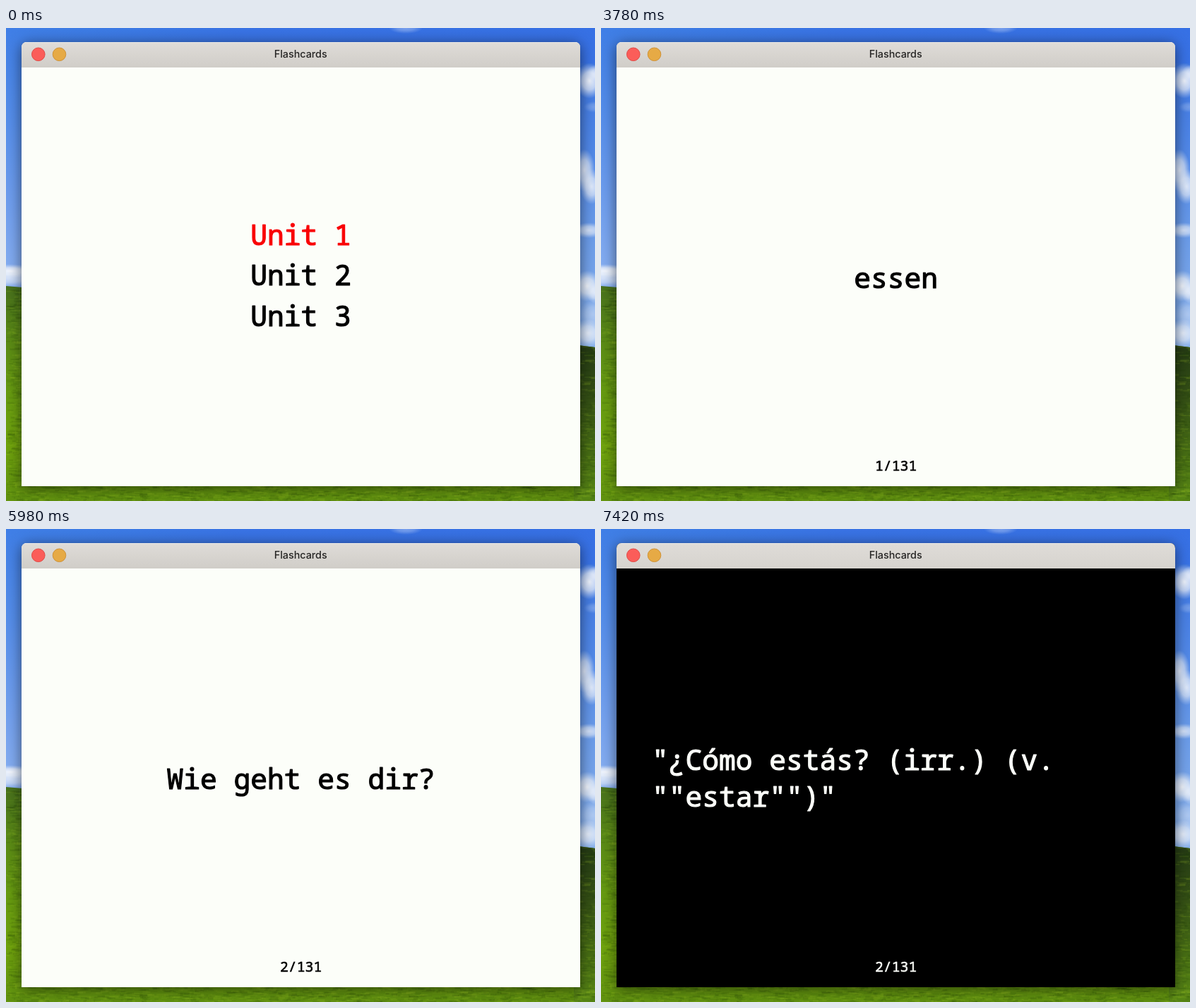
Write an HTML page with a canvas that moves like this. It is 834 px wide and 671 px high and loops after 8 s.

```html
<!DOCTYPE html>
<html lang="en">
<head>
<meta charset="utf-8">
<title>Flashcards</title>
<style>
  html, body { margin: 0; width: 100%; height: 100%; overflow: hidden; }
  canvas { display: block; width: 834px; height: 671px; }
</style>
</head>
<body>
<canvas id="stage" width="834" height="671"></canvas>
<script>
const W = 834, H = 671, LOOP = 8000;
const WIN = { x: 22, y: 20, w: 791, h: 630, bar: 36 };
const MID = 417.6;
const PAPER = '#fcfef9';
const MONO = '"Noto Sans Mono", "DejaVu Sans Mono", monospace';
const UI = 'Inter, Roboto, sans-serif';

const SCENES = [
  { at: 0, pick: 0 },
  { at: 1370, pick: 1 },
  { at: 2210, pick: 2 },
  { at: 3680, card: 1, lines: ['essen'] },
  { at: 4680, card: 1, lines: ['comer'], dark: true },
  { at: 5980, card: 2, lines: ['Wie geht es dir?'] },
  { at: 7290, card: 2, lines: ['"¿Cómo estás? (irr.) (v.', '""estar"")"'], dark: true }
];

const ctx = document.getElementById('stage').getContext('2d');
const backdrop = document.createElement('canvas');
backdrop.width = W;
backdrop.height = H;

function random(seed) {
  return () => (seed = (seed * 16807) % 2147483647) / 2147483647;
}

function fade(c, y0, y1, ...colors) {
  const g = c.createLinearGradient(0, y0, 0, y1);
  colors.forEach((color, i) => g.addColorStop(i / (colors.length - 1), color));
  return g;
}

function cloud(c, x, y, rx, ry, alpha) {
  c.save();
  c.translate(x, y);
  c.scale(rx, ry);
  const g = c.createRadialGradient(0, 0, 0, 0, 0, 1);
  g.addColorStop(0, `rgba(248,250,255,${alpha})`);
  g.addColorStop(0.5, `rgba(240,245,253,${alpha * 0.75})`);
  g.addColorStop(1, 'rgba(225,235,252,0)');
  c.fillStyle = g;
  c.fillRect(-1, -1, 2, 2);
  c.restore();
}

function hill(c) {
  c.beginPath();
  c.moveTo(0, 366);
  c.lineTo(24, 368);
  c.bezierCurveTo(300, 385, 600, 405, 810, 450);
  c.lineTo(W, 453);
  c.lineTo(W, H);
  c.lineTo(0, H);
  c.closePath();
}

function grass(c) {
  c.save();
  hill(c);
  c.clip();
  c.fillStyle = fade(c, 364, H, '#47701c', '#5a8a15', '#669a10', '#6fa30c', '#5f900f');
  c.fillRect(0, 360, W, H - 360);
  c.fillStyle = fade(c, 448, H, '#243a14', '#344f15', '#456b14', '#588714');
  c.fillRect(804, 445, 30, 226);
  const rnd = random(41);
  for (let i = 0; i < 2000; i++) {
    const onStrip = i % 3;
    const x = onStrip ? rnd() * W : (rnd() < 0.6 ? rnd() * 24 : 810 + rnd() * 24);
    const y = onStrip ? 646 + rnd() * 25 : 370 + rnd() * 280;
    const a = 0.05 + rnd() * 0.12;
    c.fillStyle = rnd() < 0.5 ? `rgba(30,60,5,${a})` : `rgba(160,200,40,${a})`;
    c.fillRect(x, y, 4 + rnd() * 10, 1 + rnd() * 2);
  }
  c.restore();
}

function roundTop(c) {
  c.beginPath();
  c.roundRect(WIN.x, WIN.y, WIN.w, WIN.h, [7, 7, 0, 0]);
}

function paintBackdrop() {
  const c = backdrop.getContext('2d');
  c.fillStyle = fade(c, 0, 370, '#3f7ee6', '#548dea', '#6f9eee', '#8ab1f2');
  c.fillRect(0, 0, W, H);
  const top = c.createLinearGradient(0, 0, W, 0);
  top.addColorStop(0, 'rgba(50,115,225,0)');
  top.addColorStop(0.4, 'rgba(54,110,228,.7)');
  top.addColorStop(1, 'rgba(50,106,228,.7)');
  c.fillStyle = top;
  c.fillRect(0, 0, W, 60);
  c.fillStyle = fade(c, 50, 450, '#3d76e2', '#5289e8', '#6f9fea', '#86b0ee');
  c.fillRect(806, 50, 28, 410);

  [
    [566, 0, 24, 8, 0.35],
    [6, 345, 34, 10, 1], [4, 355, 44, 12, 0.7],
    [826, 75, 20, 25, 0.95], [836, 64, 14, 12, 0.7],
    [832, 112, 14, 8, 0.25],
    [819, 202, 15, 30, 0.85], [829, 225, 16, 25, 0.85],
    [825, 287, 22, 11, 0.75],
    [823, 366, 20, 22, 0.95], [834, 376, 12, 15, 0.7],
    [824, 433, 22, 20, 0.85], [830, 406, 18, 20, 0.4]
  ].forEach(p => cloud(c, ...p));
  grass(c);

  c.save();
  c.shadowColor = 'rgba(0,0,0,.55)';
  c.shadowBlur = 20;
  c.shadowOffsetY = 3;
  c.fillStyle = '#888';
  roundTop(c);
  c.fill();
  c.restore();
}

function text(str, x, y, size, color, align = 'center') {
  ctx.font = `500 ${size}px ${MONO}`;
  ctx.textAlign = align;
  ctx.fillStyle = ctx.strokeStyle = color;
  ctx.lineWidth = size * 0.03;
  ctx.lineJoin = 'round';
  ctx.fillText(str, x, y);
  ctx.strokeText(str, x, y);
}

function button(x, fill, edge) {
  ctx.beginPath();
  ctx.arc(x, 37.3, 9.3, 0, Math.PI * 2);
  ctx.fillStyle = fill;
  ctx.fill();
  ctx.strokeStyle = edge;
  ctx.lineWidth = 1;
  ctx.stroke();
}

function paintWindow(dark) {
  const edge = WIN.y + WIN.bar;
  ctx.save();
  roundTop(ctx);
  ctx.clip();
  ctx.fillStyle = dark ? '#000' : PAPER;
  ctx.fillRect(WIN.x, WIN.y, WIN.w, WIN.h);
  ctx.fillStyle = fade(ctx, WIN.y, edge, '#dfdcd8', dark ? '#d6d3ce' : '#d0cdc8');
  ctx.fillRect(WIN.x, WIN.y, WIN.w, WIN.bar);
  ctx.fillStyle = 'rgba(255,255,255,.35)';
  ctx.fillRect(WIN.x, WIN.y, WIN.w, 1);
  ctx.restore();
  button(45.8, '#fb5d59', '#e04b47');
  button(75.5, '#e6aa45', '#cf9237');
  ctx.font = `500 14.3px ${UI}`;
  ctx.textAlign = 'center';
  ctx.fillStyle = '#242322';
  ctx.fillText('Flashcards', MID - 0.4, 42);
}

function paint(scene) {
  ctx.drawImage(backdrop, 0, 0);
  paintWindow(scene.dark);
  if (!scene.card) {
    for (let i = 0; i < 3; i++) {
      text(`Unit ${i + 1}`, MID, 308 + i * 57.3, 39.6, i === scene.pick ? '#f90206' : '#000');
    }
    return;
  }
  const ink = scene.dark ? PAPER : '#000';
  if (scene.lines.length === 1) {
    text(scene.lines[0], MID, 368.5, 39.6, ink);
  } else {
    scene.lines.forEach((line, i) => text(line, 72, 342 + i * 52, 39.6, ink, 'left'));
  }
  text(`${scene.card}/131`, MID, 628, 19.8, ink);
}

paintBackdrop();
const start = performance.now();

function tick(now) {
  const t = Math.max(0, now - start) % LOOP;
  paint(SCENES.findLast(s => s.at <= t));
  requestAnimationFrame(tick);
}
paint(SCENES[0]);
requestAnimationFrame(tick);
</script>
</body>
</html>
```
